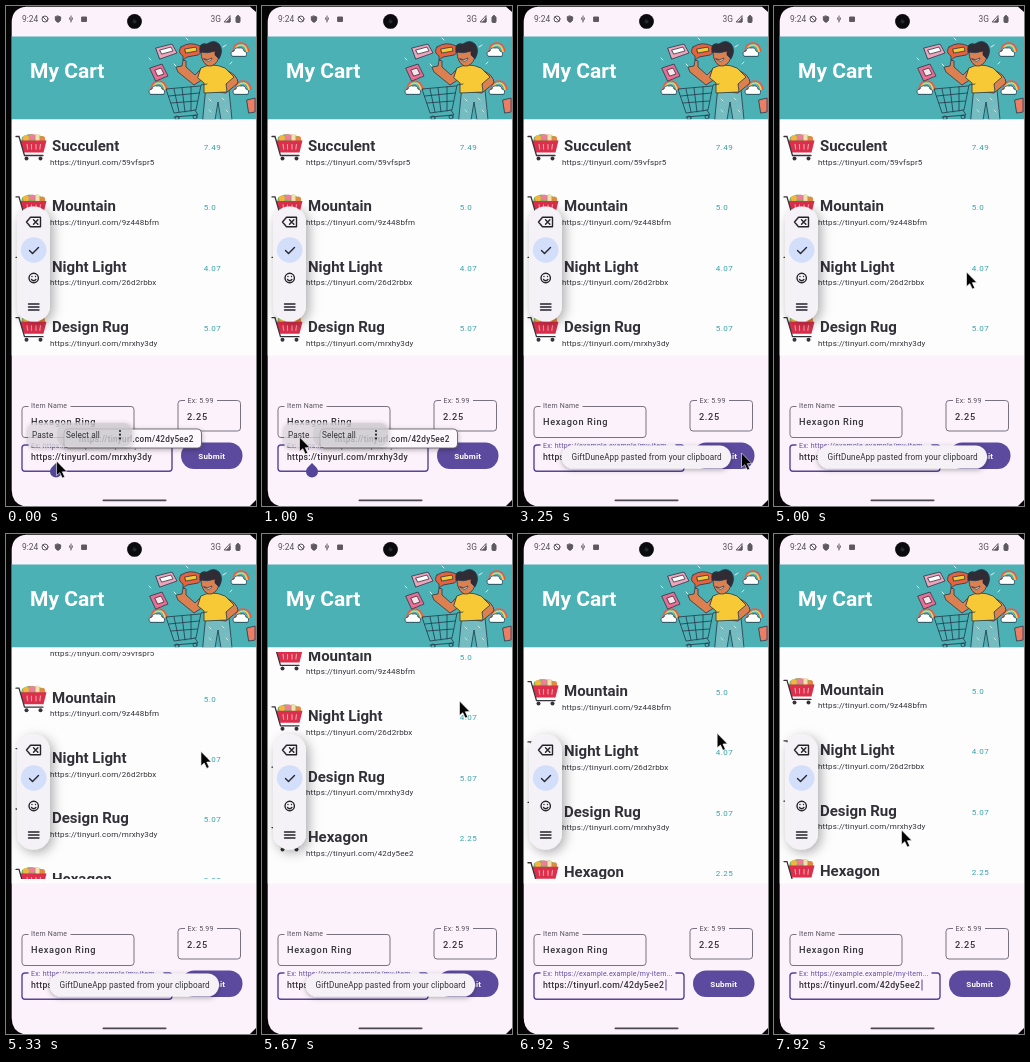
Recreate the animation shown at these times as an HTML page. Size 250 px wide and 500 px high, loop 8 s.

```html
<!DOCTYPE html>
<html lang="en">
<head>
<meta charset="utf-8">
<title>My Cart</title>
<style>
html, body { margin: 0; width: 100%; height: 100%; overflow: hidden; background: #050505; }
svg { display: block; width: 100vw; height: 100vh; }
text { font-family: Roboto, "Open Sans", sans-serif; fill: #333138; }
.title { font-size: 15px; font-weight: 700; }
.url { font-size: 8px; letter-spacing: .14px; }
.price { font-size: 8px; letter-spacing: .5px; fill: #35a3a8; }
.input { font-size: 9.2px; letter-spacing: .65px; font-weight: 500; }
.link { font-size: 8.7px; letter-spacing: .27px; font-weight: 500; }
.label { font-size: 7px; letter-spacing: .2px; fill: #55515c; }
.small { font-size: 8.2px; letter-spacing: .1px; }
.status { font-size: 8.4px; fill: #55515a; }
.box { fill: none; stroke: #77727e; }
.ink { fill: none; stroke: #24232a; stroke-width: 1.4; stroke-linecap: round; stroke-linejoin: round; }
.art { stroke: #25384a; stroke-width: .8; stroke-linejoin: round; stroke-linecap: round; }
</style>
</head>
<body>
<svg viewBox="0 0 250 500" preserveAspectRatio="none">
  <defs>
    <clipPath id="screen"><path d="M244 .7H20Q5.700 2 5.700 17V484Q6 497 17 500H244L250 494V6Z"/></clipPath>
    <clipPath id="viewport"><rect x="6" y="118" width="244" height="227"/></clipPath>
    <clipPath id="banner"><rect x="5" y="30.500" width="245" height="83"/></clipPath>
    <filter id="shadow" x="-40%" y="-40%" width="180%" height="180%">
      <feDropShadow dx="0" dy="1.5" stdDeviation="2.5" flood-color="#000" flood-opacity=".3"/>
    </filter>
    <filter id="deepShadow" x="-100%" y="-30%" width="300%" height="160%">
      <feDropShadow dx="3" dy="3" stdDeviation="6" flood-color="#000" flood-opacity=".32"/>
    </filter>
    <g id="cart">
      <path d="M15 136l1-5 4-2 3-1 4 1 4-1 4 2 3 2 2 4z" fill="#7cb65a"/>
      <circle cx="20" cy="132" r="3" fill="#f2b544"/>
      <circle cx="26" cy="131" r="3" fill="#ef7d9b"/>
      <rect x="29.500" y="128" width="4" height="7" rx="1" fill="#f6dfb2"/>
      <circle cx="36.500" cy="132.500" r="2.500" fill="#e9873e"/>
      <path d="M14 134.500H40.500L37.500 146.500H18Z" fill="#dc2f4c"/>
      <path d="M21 138l.7 5.500M25.500 138v5.500M30 138v5.500M34.500 138l-.7 5.500" stroke="#f4a0ab" stroke-width="1.100"/>
      <path d="M10 130.500h3L18.500 149.500H37" fill="none" stroke="#35323a" stroke-width="1.3" stroke-linecap="round"/>
      <circle cx="20.500" cy="152.500" r="2" fill="#35323a"/><circle cx="34.500" cy="152.500" r="2" fill="#35323a"/>
    </g>
    <g id="rainbow" fill="none" stroke-width="1.6">
      <path d="M-6-1q1-8 8-8t8 9" stroke="#e95950"/><path d="M-4-1q1-6 6-6t6 7" stroke="#f7cc50"/>
      <path class="art" d="M-7 4Q-10 0-5-1Q-4-5 0-4Q4-5 5-1Q9 0 7 4Z" fill="#fff"/>
    </g>
  </defs>

  <rect width="250" height="500" fill="#050505"/>
  <g clip-path="url(#screen)">
    <rect width="250" height="500" fill="#fcf2fb"/>

    <text class="status" x="16" y="16">9:24</text>
    <g class="ink" style="stroke:#5d5862;stroke-width:1">
      <circle cx="39" cy="13" r="3"/><path d="M37 11l4 4"/>
      <path d="M52 10l2.700 1v2.200q0 2-2.700 3.200q-2.700-1.200-2.700-3.200v-2.200z" fill="#5d5862"/>
      <path d="M65 10v3M63.500 12q0 2.500 1.500 2.500q1.500 0 1.500-2.500M65 15v1"/>
      <rect x="76" y="11" width="4.500" height="4.500" fill="#5d5862"/>
      <path d="M218.500 16h5.500V10z"/><path d="M221 16h3V12.500z" fill="#5d5862"/>
      <rect x="230" y="10.500" width="4" height="6" rx="1" fill="#5d5862"/><path d="M231.500 9.500h1"/>
    </g>
    <text class="status" x="204.500" y="16">3G</text>
    <circle cx="128.500" cy="15.400" r="7.400" fill="#0b0b0d"/><circle cx="128.500" cy="15.400" r="2" fill="#24252e"/>

    <g clip-path="url(#banner)">
      <rect x="5" y="30" width="245" height="84" fill="#4cb1b4"/>
      <text x="24" y="72" style="font-size:21px;font-weight:700;fill:#fff">My Cart</text>
      <use href="#rainbow" x="151" y="84"/><use href="#rainbow" x="235" y="84"/><use href="#rainbow" x="233" y="46"/>
      <g class="art">
        <path d="M150 42l16-4 5 9-17 6z" fill="#f1a3bb"/><path d="M154 44l11-3 2 4-11 3z" fill="#fff"/>
        <path d="M144 62l12-4 6 12-12 5z" fill="#ee6c91"/><path d="M149 64l6-2 3 6-6 2z" fill="#fbe2e6"/>
        <path d="M175 41q9-6 19-1 5 5-2 9l-11 2-4 3 0-4q-6-4-2-9z" fill="#e8633d"/>
        <path d="M179 43l11-2 1 4-11 2z" fill="#f8c936"/>
        <path d="M200 84h23l3 30h-11l-3-18-3 18h-12z" fill="#74bcc0"/>
        <path d="M203 93l2 2M216 92l2 2M203 104l2 2M220 104l2 2" stroke="#e4f1ee" fill="none"/>
        <path d="M196 62l-7 7-9-8 0-6-3-1-1 6-6 1 2 5 16 13 12-8z" fill="#dd8050"/>
        <path d="M220 64q12 5 12 13l-12 10-18-2 1-4 16-1 3-5z" fill="#dd8050"/>
        <path d="M195 62Q206 56 219 62l9 9-8 7 1 8-23 1 0-10-6-5z" fill="#f8c936"/>
        <path d="M195 46l15-4 3 9q-3 10-11 9-7-4-7-14z" fill="#dd8050"/>
        <path d="M194 46q-2-10 7-8 7-5 12 0 5 6 0 15l-4-4 0-4q-7 3-15 1z" fill="#302b35"/>
        <path d="M198 53q4 2 8-1-2 6-8 1z" fill="#fff"/>
        <path d="M241 94l8-2v14l-6 1z" fill="#ef7d65"/>
      </g>
      <g class="art" fill="none">
        <path d="M201 78l-6 1-5 25-22 3-8-24 34-3M163 90l30-3M165 97l26-2M168 83l5 23M176 82l3 24M185 81v24M189 104l3 5-24 2"/>
        <circle cx="171" cy="112" r="2"/><circle cx="189" cy="111" r="2"/>
        <path d="M168 58l2 2M180 32l2 2M217 41l3-2M224 58l2-2M143 52l2 2" stroke="#fff"/>
      </g>
    </g>

    <rect x="5" y="113.500" width="245" height="236" fill="#fefdfe"/>
    <g clip-path="url(#viewport)"><g id="list"></g></g>

    <rect x="11" y="200.500" width="33" height="115" rx="16" fill="#f4f2f6" filter="url(#deepShadow)"/>
    <circle cx="27.700" cy="244" r="12.800" fill="#d2defa"/>
    <g class="ink">
      <path d="M20.500 216l4-4.800h10v9.600h-10zM27.500 213.800l4.400 4.400M31.900 213.800l-4.400 4.400"/>
      <path d="M23.500 244.500l3 3 6-6"/>
      <circle cx="27.700" cy="272" r="4.700"/><path d="M25.500 273.500q2.200 2.500 4.400 0M26 270.500v.1M29.500 270.500v.1"/>
      <path d="M22.500 298h10.500M22.500 301h10.500M22.500 304h10.500"/>
    </g>

    <rect class="box" x="16" y="400.500" width="112" height="31" rx="3"/>
    <rect x="22.500" y="396.500" width="42" height="8" fill="#fcf2fb"/>
    <text class="label" x="25" y="401.500">Item Name</text>
    <text class="input" x="25" y="418.700">Hexagon Ring</text>
    <rect class="box" x="172" y="394.500" width="62.500" height="30.500" rx="3"/>
    <rect x="179" y="390.500" width="32" height="8" fill="#fcf2fb"/>
    <text class="label" x="181.500" y="396.700">Ex: 5.99</text>
    <text class="input" x="181" y="413.700">2.25</text>

    <rect class="box" x="16" y="439" width="150" height="26.300" rx="3" style="stroke:#54449a;stroke-width:1.400"/>
    <rect x="22.500" y="435.500" width="135" height="8" fill="#fcf2fb"/>
    <text class="label" x="25" y="441.500" style="fill:#5e4da3">Ex: https://example.example/my-item...</text>
    <text class="link" id="link" x="25" y="454"></text>
    <rect id="caret" x="147.500" y="445.500" width="1" height="11" fill="#54449a"/>
    <rect x="175" y="436.500" width="61.500" height="26.500" rx="13.200" fill="#5b4a9d"/>
    <text x="205.700" y="452.700" text-anchor="middle" style="font-size:8px;font-weight:600;letter-spacing:.2px;fill:#fff">Submit</text>

    <g id="menu">
      <rect x="58" y="423" width="137.500" height="19" rx="4" fill="#fcf8fc" stroke="#555159" stroke-width=".8" filter="url(#shadow)"/>
      <text class="link" x="73" y="436" style="font-size:8.2px">https://tinyurl.com/42dy5ee2</text>
      <g opacity=".8">
        <rect x="22" y="416.500" width="104.500" height="24.500" rx="7" fill="#dcd7dd" filter="url(#shadow)"/>
        <rect x="51" y="417" width="75" height="23.500" rx="9" fill="#cbc8cd"/>
      </g>
      <text class="small" x="26" y="431.500">Paste</text>
      <text class="small" x="60" y="431.500">Select all</text>
      <g fill="#29272d"><circle cx="114" cy="425" r="1.100"/><circle cx="114" cy="428.700" r="1.100"/><circle cx="114" cy="432.400" r="1.100"/></g>
      <path d="M50 457l4.200 4.200a6 6 0 1 1-8.400 0z" fill="#54449a"/>
    </g>

    <g id="toast">
      <rect id="toastBody" x="43.500" y="439.500" width="169.500" height="23" rx="11.500" fill="#f5f1f6" filter="url(#shadow)"/>
      <text class="small" id="toastText" x="53.500" y="454">GiftDuneApp pasted from your clipboard</text>
    </g>

    <rect x="96.500" y="493.500" width="64" height="1.700" rx=".8" fill="#4b474f"/>
  </g>
  <path id="pointer" d="M.5 0V14.500L3.800 11.700L6.300 17L8.700 15.900L6.300 10.700L10.800 10.500Z" fill="#050505" stroke="#fff" stroke-width=".6"/>
</svg>
<script>
const LOOP = 8000;
const $ = id => document.getElementById(id);
const items = [
  ["Succulent", "59vfspr5", "7.49"],
  ["Mountain", "9z448bfm", "5.0"],
  ["Night Light", "26d2rbbx", "4.07"],
  ["Design Rug", "mrxhy3dy", "5.07"],
  ["Hexagon", "42dy5ee2", "2.25"]
];
$("list").innerHTML = items.map(([name, code, price], i) => `
  <g transform="translate(0 ${i * 60.4})">
    <use href="#cart"/>
    <text class="title" x="46" y="145">${name}</text>
    <text class="url" x="44" y="158.500">https://tinyurl.com/${code}</text>
    <text class="price" x="197.700" y="144">${price}</text>
  </g>`).join("");

// Each row: time, then values
const pointerPath = [
  [0, 50, 455], [200, 50, 455], [900, 37, 431], [1550, 37, 431], [1900, 73, 453],
  [2000, 73, 453], [2500, 210, 441], [2900, 227, 458], [3250, 223, 447], [3900, 223, 447],
  [4670, 200, 270], [4760, 192, 260], [4840, 192, 266], [5000, 192, 266], [5670, 197, 167],
  [5800, 197, 166], [6400, 198, 202], [6670, 198, 202], [7080, 199, 198], [7250, 199, 198],
  [7850, 127, 296]
];
const scrollPath = [[5020, 0], [5670, 78.5], [5800, 79.5], [6400, 41], [6670, 41], [7080, 44.5]];
const toastFade = [[1750, 0], [2060, 1], [5850, 1], [6150, 0]];
const toastTextFade = [[1940, 0], [2100, 1]];
const PASTE = 1640;

function sample(rows, t) {
  const next = rows.findIndex(row => row[0] > t);
  if (next === 0) return rows[0].slice(1);
  if (next < 0) return rows.at(-1).slice(1);
  const a = rows[next - 1], b = rows[next];
  const u = (t - a[0]) / (b[0] - a[0]);
  const eased = u * u * (3 - 2 * u);
  return a.slice(1).map((v, i) => v + (b[i + 1] - v) * eased);
}

function draw() {
  const t = performance.now() % LOOP;
  const [x, y] = sample(pointerPath, t);
  $("pointer").setAttribute("transform", `translate(${x} ${y})`);
  $("list").setAttribute("transform", `translate(0 ${-sample(scrollPath, t)[0]})`);
  $("link").textContent = "https://tinyurl.com/" + (t < PASTE ? "mrxhy3dy" : "42dy5ee2");
  $("menu").style.opacity = t < PASTE ? 1 : 0;
  $("toast").style.opacity = sample(toastFade, t)[0];
  $("toastText").style.opacity = sample(toastTextFade, t)[0];
  $("toastBody").setAttribute("fill", t < 2000 ? "#e2dee5" : "#f5f1f6");
  $("caret").style.opacity = t > PASTE && Math.floor(t / 500) % 2 ? 1 : 0;
  requestAnimationFrame(draw);
}
draw();
</script>
</body>
</html>
```
